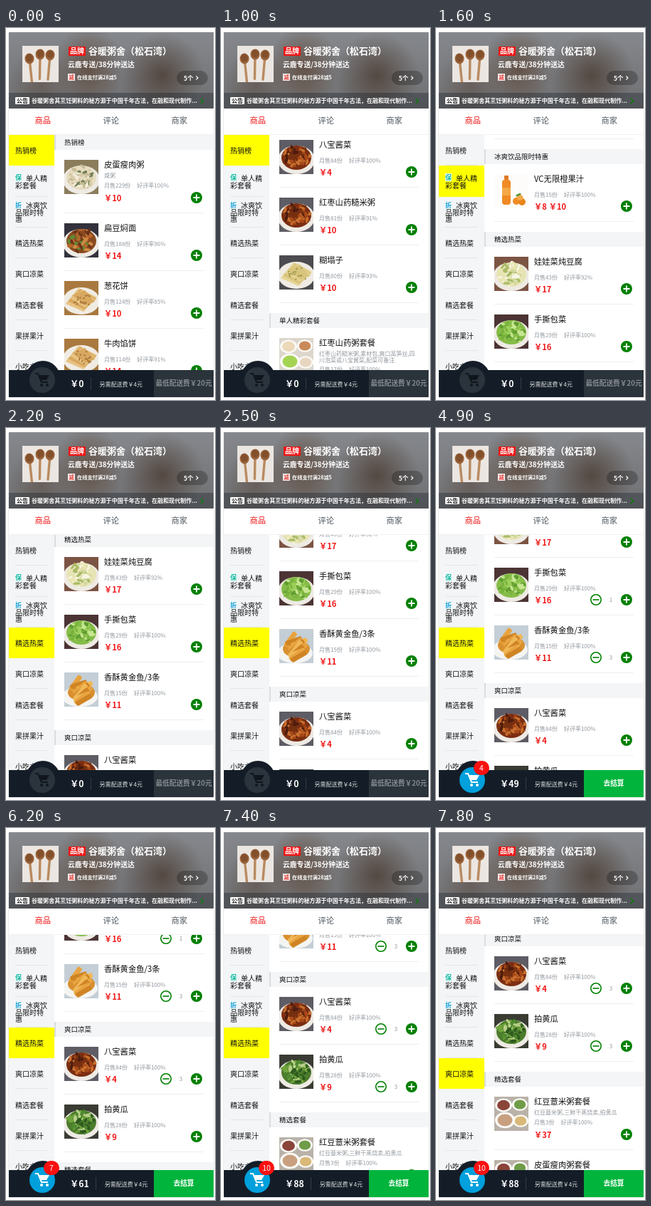
Recreate the animation shown at these times as an HTML page. Size 294 by 522 pixels, loop 8000 ms.

```html
<!DOCTYPE html>
<html lang="zh-CN">
<head>
<meta charset="utf-8">
<title>点餐</title>
<style>
html, body { margin: 0; width: 294px; height: 522px; overflow: hidden; background: #fff; }
body { position: relative; font-family: "Noto Sans CJK SC", "Noto Sans CJK", "Noto Sans", sans-serif; color: #111; }
div, span.t, svg { position: absolute; }
.t { white-space: pre; line-height: 20px; }
#app { left: 4px; top: 6px; width: 288px; height: 512px; background: #fff; box-shadow: 0 0 2px #c4c8cc; }
#head { left: 4px; top: 6px; width: 288px; height: 107px; overflow: hidden;
  background:
    radial-gradient(ellipse 50px 60px at 112px 50px, rgba(92, 68, 52, .75), transparent),
    radial-gradient(ellipse 60px 60px at 215px 60px, rgba(72, 56, 46, .75), transparent),
    radial-gradient(ellipse 45px 55px at 45px 75px, rgba(92, 76, 66, .55), transparent),
    linear-gradient(#85888d, #6f6f71); }
#head .strip { left: 0; top: 85px; width: 288px; height: 22px; background: rgba(7, 17, 27, .3); }
#head .pill { left: 236px; top: 54px; width: 44px; height: 20px; border-radius: 10px; background: rgba(0, 0, 0, .25); }
#menu { left: 4px; top: 150px; width: 64px; height: 330px; overflow: hidden; background: #f3f5f7; }
.cell { left: 0; width: 64px; height: 43.3px; }
.cell.on { background: #ff0; }
.cell::after { content: ""; position: absolute; left: 9px; right: 9px; bottom: 0; height: 1px; background: #e2e5e8; }
.cell.on::after { display: none; }
#view { left: 68px; top: 150px; width: 224px; height: 330px; overflow: hidden; background: #fff; }
#list { left: -68px; top: 0; width: 292px; }
.title { left: 68px; width: 222px; height: 21px; border-left: 2px solid #d9dde1; background: #f3f5f7; }
.line { left: 82px; width: 196px; height: 1px; background: #eceef0; }
.sale { color: #93999f; }
.sale i { font-style: normal; margin-left: 9px; }
.price { color: #f01414; font-weight: 700; }
#bar { left: 4px; top: 480px; width: 288px; height: 38px; background: #141d27; }
#sum { left: 86px; top: 9px; height: 20px; display: flex; align-items: center; white-space: pre; }
#total { font: 700 12.3px/20px "Noto Sans CJK SC", sans-serif; color: #fff; padding-right: 9px; }
#sum b { width: 1px; height: 18px; background: #343c45; margin-right: 12px; }
#fee { font-size: 8px; font-weight: 500; color: #dfe1e3; }
#pay { right: 0; top: 0; width: 84px; height: 38px; font-weight: 700; font-size: 9.7px; line-height: 37px;
  text-align: center; white-space: nowrap; background: #2b333b; color: #858a8f; }
#pay.ok { background: #00b43c; color: #fff; }
#ring { left: 28px; top: 467px; width: 48px; height: 50px; border-radius: 25px; background: #141d27; }
#disc { left: 5px; top: 8.5px; width: 36px; height: 36px; border-radius: 50%; background: #2b343c; color: #10161c; }
#disc.ok { background: #00a0dc; color: #fff; }
#badge { left: 53px; top: 467px; width: 22px; height: 20px; border-radius: 10px; background: #fa1010; color: #fff;
  font-size: 10.5px; line-height: 19px; text-align: center; }
</style>
</head>
<body>
<div id="app"></div>
<div id="head"></div>
<div id="tabs"></div>
<div id="menu"></div>
<div id="view"><div id="list"></div></div>
<div id="bar">
  <div id="sum"><span id="total"></span><b></b><span id="fee">另需配送费￥4元</span></div>
  <div id="pay"></div>
</div>
<div id="ring"><div id="disc">
  <svg width="36" height="36" viewBox="-1 0 36 36" fill="none" stroke="currentColor" stroke-width="2">
    <path d="M7 9h4l5 12h9" />
    <path d="M13 11h14l-4 7h-8z" fill="currentColor" stroke="none" />
    <g fill="currentColor" stroke="none"><circle cx="16" cy="25" r="2" /><circle cx="24" cy="25" r="2" /></g>
  </svg>
</div></div>
<div id="badge"></div>
<script>
const $ = id => document.getElementById(id);

// Text with its left edge at x and its middle at y
const text = (x, y, size, str, css = '', cls = '') =>
  `<span class="t ${cls}" style="left:${x}px;top:${y - 10.5}px;font-size:${size}px;${css}">${str}</span>`;
const box = (x, y, w, h, css) =>
  `<div style="left:${x}px;top:${y}px;width:${w}px;height:${h}px;${css}"></div>`;
const svg = (x, y, w, h, body) =>
  `<svg style="left:${x}px;top:${y}px" width="${w}" height="${h}" viewBox="0 0 ${w} ${h}">${body}</svg>`;
const oval = (x, y, rx, ry, fill, turn = 0) =>
  `<ellipse cx="${x}" cy="${y}" rx="${rx}" ry="${ry}" fill="${fill}" transform="rotate(${turn} ${x} ${y})"/>`;
const rect = (x, y, w, h, fill, r = 0, turn = 0) =>
  `<rect x="${x}" y="${y}" width="${w}" height="${h}" rx="${r}" fill="${fill}" transform="rotate(${turn} ${x + w / 2} ${y + h / 2})"/>`;

function random(seed) {
  return () => {
    seed = (seed * 16807) % 2147483647;
    return seed / 2147483647;
  };
}

// Dish pictures, 48 x 48
const draw = {
  bits(rnd, base, colors) {
    let s = oval(24, 28, 26, 20, '#eeeae4') + oval(24, 25, 21, 17, base);
    for (let i = 0; i < 50; i++) {
      const a = rnd() * 6.28, d = Math.sqrt(rnd());
      s += oval(24 + 18 * d * Math.cos(a), 24 + 15 * d * Math.sin(a), 2.5 + rnd() * 3, 1.2 + rnd() * 1.6,
        colors[i % colors.length], rnd() * 180);
    }
    return s;
  },
  sticks(rnd, base, colors) {
    let s = oval(22, 34, 25, 14, '#f4f4f2') + oval(24, 28, 19, 12, base);
    for (let i = 0; i < 11; i++)
      s += rect(3 + rnd() * 17, 11 + i * 2.4, 24, 7, colors[i % colors.length], 2, -55 + rnd() * 40);
    return s;
  },
  cake(rnd, base, colors) {
    let s = oval(24, 28, 26, 19, '#f0ece4');
    for (let i = 0; i < 4; i++)
      s += `<path d="M${2 + i * 3} ${32 - i * 4}L${20 + i * 3} ${10 + i}L${46 - i} ${23 + i * 2}L${27 + i} ${43 - i * 3}Z" fill="${i % 2 ? base : colors[0]}"/>`;
    for (let i = 0; i < 18; i++)
      s += oval(13 + rnd() * 24, 17 + rnd() * 18, 1.5, 1, colors[1], rnd() * 180);
    return s;
  },
  bowls(rnd, base, colors) {
    return [[13, 12, 12], [36, 11, 11], [37, 34, 11], [15, 33, 14]].map(([x, y, r], i) =>
      oval(x, y, r, r * .8, '#fbfaf7') + oval(x, y, r * .75, r * .6, i ? colors[i - 1] : base)).join('');
  },
  juice(rnd, base, colors) {
    return rect(14, 2, 6, 6, '#e07a24', 1) + rect(11, 8, 12, 35, base, 4) + rect(11, 19, 12, 11, colors[0]) +
      oval(31, 38, 5, 5, base) + oval(39, 39, 5, 5, colors[1]) + oval(36, 33, 4.5, 4, colors[0]) +
      oval(34, 29, 4, 1.5, '#5f9440', -25);
  }
};

const pics = {
  congee: ['bits', '#8b7d5c', '#e6dcc0', ['#f3ecd8', '#c8bd98', '#6f7d54', '#d8cba8']],
  noodle: ['bits', '#33323c', '#8a4a20', ['#b8652a', '#6b3218', '#5f8a34', '#d08a45']],
  pancake: ['cake', '#a9793f', '#d9a860', ['#e8c382', '#a8763a']],
  gold: ['bits', '#b5a070', '#e8b04a', ['#f0c060', '#e5a038', '#f6d488']],
  bean: ['bits', '#9a8d84', '#7d3a2c', ['#8f4a38', '#5e281e', '#b98070']],
  pickle: ['bits', '#5e5c64', '#7c2e12', ['#a84818', '#4c1c0e', '#c8702e', '#74300f']],
  omelet: ['cake', '#4c4c50', '#d8c47c', ['#e6d494', '#a39a4c']],
  set: ['bowls', '#dcd6cc', '#ecd9b8', ['#c98a5a', '#e8d6c0', '#a5d453']],
  juice: ['juice', '#fdfcfa', '#f08a24', ['#f4a848', '#e8861a']],
  tofu: ['bits', '#7c5444', '#e6e4b4', ['#f8f6e4', '#d2d89c', '#ecE6b4', '#aabb68']],
  cabbage: ['bits', '#4c3434', '#86bc48', ['#9ed05c', '#5f9c30', '#c6e690', '#78b23c']],
  fish: ['sticks', '#c4ced6', '#d89030', ['#e8a440', '#d08424', '#f0b858']],
  cucumber: ['bits', '#3a3c34', '#4c7c2c', ['#6fa43c', '#2f5a1e', '#b8d088', '#4f8a30']],
  tray: ['bowls', '#b9b2a8', '#8a4438', ['#6f9c48', '#d9b878', '#c8a080']]
};

function picture(key, y, seed) {
  const [kind, bg, base, colors] = pics[key];
  return svg(82, y, 48, 48, rect(0, 0, 48, 48, bg) + draw[kind](random(seed * 977 + 13), base, colors));
}

// Dish: name, sold, rating, price, picture, description, second price
const groups = [
  ['热销榜', [
    ['皮蛋瘦肉粥', 229, 100, 10, 'congee', '咸粥'],
    ['扁豆焖面', 188, 96, 14, 'noodle'],
    ['葱花饼', 124, 85, 10, 'pancake'],
    ['牛肉馅饼', 114, 91, 14, 'pancake'],
    ['猪肉白菜锅贴/10个', 101, 93, 17, 'pancake'],
    ['南瓜粥', 91, 100, 9, 'gold', '甜粥'],
    ['红豆薏米美肤粥', 86, 100, 12, 'bean', '甜粥'],
    ['八宝酱菜', 84, 100, 4, 'pickle'],
    ['红枣山药糙米粥', 81, 91, 10, 'pickle'],
    ['糊塌子', 80, 93, 10, 'omelet']]],
  ['单人精彩套餐', [
    ['红枣山药粥套餐', 17, 100, 29, 'set', '红枣山药糙米粥,素材包,爽口莴笋丝,四<br>川泡菜或八宝酱菜,配菜可备注']]],
  ['冰爽饮品限时特惠', [['VC无限橙果汁', 15, 100, 8, 'juice', '', 10]]],
  ['精选热菜', [
    ['娃娃菜炖豆腐', 43, 92, 17, 'tofu'],
    ['手撕包菜', 29, 100, 16, 'cabbage'],
    ['香酥黄金鱼/3条', 15, 100, 11, 'fish']]],
  ['爽口凉菜', [
    ['八宝酱菜', 84, 100, 4, 'pickle'],
    ['拍黄瓜', 28, 100, 9, 'cucumber']]],
  ['精选套餐', [
    ['红豆薏米粥套餐', 3, 100, 37, 'tray', '红豆薏米粥,三鲜干蒸烧卖,拍黄瓜'],
    ['皮蛋瘦肉粥套餐', 12, 100, 31, 'tray', '皮蛋瘦肉粥,三鲜干蒸烧卖,拍黄瓜']]]
];

const tops = [], prices = {};

function dish(d, y, id) {
  const [name, sold, rating, price, pic, desc, second] = d;
  const extra = desc ? (desc.includes('<br>') ? 16 : 8) : 0;
  const py = y + 45 + extra;
  prices[id] = price;
  let s = picture(pic, y, pic === 'pickle' ? 3 : y) + text(138, y + 6, 11.3, name);
  if (desc) s += text(138, y + 22, 8, desc, 'line-height:9.2px;margin-top:5px', 'sale');
  s += text(138, y + 29 + extra - (desc ? 1 : 0), 8, `月售${sold}份<i>好评率${rating}%</i>`, '', 'sale');
  s += text(138, py, 11.2, `￥${price}` + (second ? `<span style="margin-left:3px">￥${second}</span>` : ''), '', 'price');
  s += svg(259, py - 9, 18, 18, oval(9, 9, 8, 8, '#008000') + rect(4.5, 8, 9, 2, '#fff') + rect(8, 4.5, 2, 9, '#fff'));
  s += `<div id="m${id}" style="left:0;top:${py}px;display:none">` +
    svg(216, -9, 18, 18, '<circle cx="9" cy="9" r="7.2" fill="#fff" stroke="#008000" stroke-width="1.6"/>' + rect(4.5, 8.2, 9, 1.6, '#008000')) +
    `<span class="t sale" id="n${id}" style="left:236px;top:-10.5px;width:20px;text-align:center;font-size:8px"></span></div>`;
  s += `<div class="line" style="top:${y + 66 + extra}px"></div>`;
  return [s, 81 + extra];
}

function buildList() {
  let y = 0, html = '';
  groups.forEach(([title, dishes], g) => {
    tops.push(y);
    html += `<div class="title" style="top:${y}px"></div>` + text(82, y + 10.5, 9.5, title);
    y += 35;
    dishes.forEach((d, i) => {
      const [s, h] = dish(d, y, `${g}_${i}`);
      html += s;
      y += h;
    });
  });
  $('list').innerHTML = html;
}

function buildMenu() {
  const tag = (str, color, y) => text(9, y, 9, str, `font-weight:700;color:${color};background:#e9fbfa;line-height:11px;margin-top:4.5px`);
  const labels = [
    text(9, 22, 10, '热销榜'),
    tag('保', '#18b8a0', 17) + text(24, 18.5, 10, '单人精') + text(9, 28, 10, '彩套餐'),
    tag('折', '#1c9ad6', 12) + text(24, 13, 10, '冰爽饮') + text(9, 23, 10, '品限时特') + text(9, 32, 10, '惠'),
    ...['精选热菜', '爽口凉菜', '精选套餐', '果拼果汁', '小吃主食'].map(s => text(9, 22.5, 10, s))
  ];
  $('menu').innerHTML = labels.map((s, i) => `<div class="cell" style="top:${i * 43.3}px">${s}</div>`).join('');
}

function buildHead() {
  const spoon = (x, y, turn) => `<g transform="rotate(${turn} ${x} ${y})">` + rect(x - 1.7, y, 3.4, 36, '#b98a60', 1.5) +
    oval(x, y, 6.5, 7.5, '#9a633a') + oval(x, y - 1, 4.8, 5.5, '#83502c') + '</g>';
  const white = 'color:#fff;';
  const bold = white + 'font-weight:700;';
  $('head').innerHTML =
    svg(19, 19, 51, 51, rect(0, 0, 51, 51, '#ebe6e1') + spoon(10, 18, -6) + spoon(25, 12, 1) + spoon(39, 13, 5)) +
    box(84, 20, 24, 13, 'background:#f01414;border-radius:1px') +
    text(86, 26.5, 10, '品牌', bold) +
    text(112, 26.5, 13, '谷暖粥舍（松石湾）', bold) +
    text(83, 45.5, 9.8, '云鹿专送/38分钟送达', bold) +
    box(83, 58, 10, 10, 'background:#fbeeee') + text(84.2, 63, 7.5, '减', 'color:#e0403a;font-weight:700') +
    text(96, 63, 7.2, '在线支付满28减5', bold) +
    '<div class="pill"></div>' + text(246, 64, 8.6, '5个', bold) +
    svg(262, 60, 6, 8, '<path d="M1.5 1.5l2.5 2.5l-2.5 2.5" fill="none" stroke="#fff" stroke-width="1.2"/>') +
    '<div class="strip"></div>' + box(9, 91, 20, 10, 'background:#fff;border-radius:1px') +
    text(11, 96, 8, '公告', 'color:#222;font-weight:700') +
    text(32, 96, 8.05, '谷暖粥舍其烹饪粥料的秘方源于中国千年古法，在融和现代制作...', bold) +
    svg(269, 92, 6, 9, '<path d="M1 1l3.5 3.5L1 8" fill="none" stroke="#008000" stroke-width="1.3"/>');
  $('tabs').innerHTML = text(40.5, 129.5, 11.3, '商品', 'color:#f01414') +
    text(136.5, 129.5, 11.3, '评论', 'color:#4d555d') + text(232.5, 129.5, 11.3, '商家', 'color:#4d555d') +
    box(4, 149, 288, 1, 'background:#f0f2f3');
}

// Swipes: start, end, from, to, ease-out power
const swipes = [
  [600, 1500, 0, 853, 2.2], [1500, 1900, 853, 1074, 3], [2100, 2500, 1074, 1182, 2],
  [4800, 4900, 1182, 1187, 1], [4900, 5100, 1187, 1272, 1.5], [5300, 5400, 1272, 1273, 1],
  [7300, 7600, 1273, 1399, 2], [7700, 7800, 1399, 1400, 1]
];
const taps = {
  '3_1': [3300], '3_2': [4300, 4500, 4600], '4_0': [5900, 6000, 6200], '4_1': [6800, 6900, 7000]
};

function scrollAt(t) {
  let pos = 0;
  for (const [a, b, from, to, pow] of swipes) {
    if (t < a) break;
    pos = from + (to - from) * (1 - (1 - Math.min(1, (t - a) / (b - a))) ** pow);
  }
  return Math.round(pos);
}

function render(t) {
  const pos = scrollAt(t);
  const active = tops.filter(y => y <= pos).length - 1;
  $('list').style.transform = `translateY(${-pos}px)`;
  [...$('menu').children].forEach((c, i) => c.classList.toggle('on', i === active));

  let count = 0, total = 0;
  for (const id in taps) {
    const n = taps[id].filter(at => at <= t).length;
    $('m' + id).style.display = n ? 'block' : 'none';
    $('n' + id).textContent = n;
    count += n;
    total += n * prices[id];
  }
  $('total').textContent = '￥' + total;
  $('badge').textContent = count;
  $('badge').style.display = count ? 'block' : 'none';
  $('disc').classList.toggle('ok', count > 0);
  $('pay').classList.toggle('ok', total >= 20);
  $('pay').textContent = !total ? '最低配送费￥20元' : total < 20 ? `还差￥${20 - total}元起送` : '去结算';
}

buildHead();
buildMenu();
buildList();

// The picture advances ten times a second
let shown = -1;
const start = performance.now();
function tick() {
  const t = Math.floor(((performance.now() - start) % 8000) / 100) * 100;
  if (t !== shown) render(shown = t);
  requestAnimationFrame(tick);
}
tick();
</script>
</body>
</html>
```
